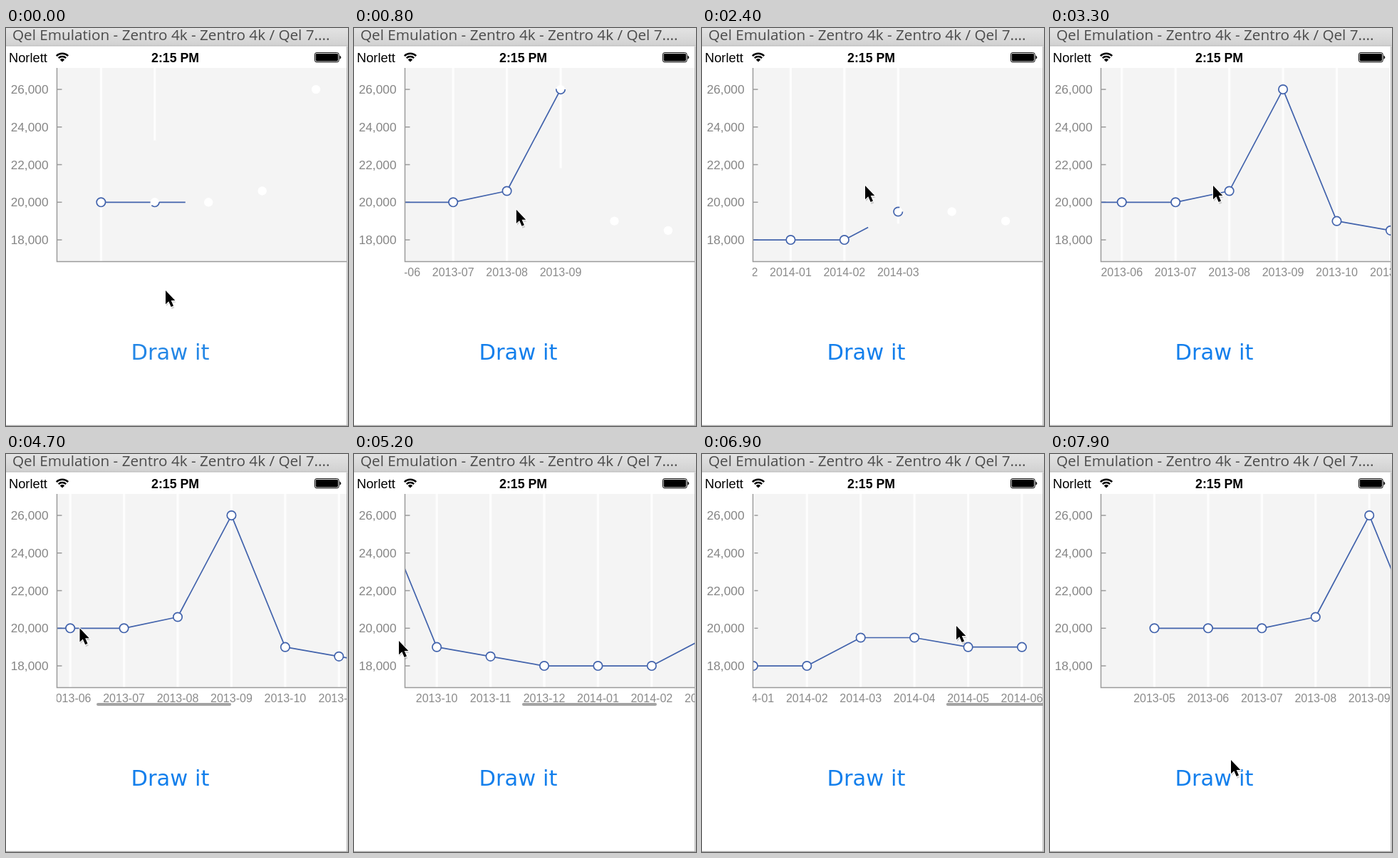
Write an HTML page that moves like this. It is 480 by 558 pixels and loops after 8000 ms.

```html
<!DOCTYPE html>
<html lang="en">
<head>
<meta charset="utf-8">
<title>Line chart</title>
<style>
  html, body { margin: 0; width: 100%; height: 100%; overflow: hidden; background: #fff; }
  svg { display: block; width: 480px; height: 558px; }
  text { font-family: "Liberation Sans", Arial, sans-serif; }
  .title { font: 20.7px "Open Sans", sans-serif; fill: #4b4b4b; }
  .status { font-size: 18.3px; }
  .clock { font-size: 17.7px; font-weight: bold; text-anchor: middle; }
  .value { font-size: 17.3px; fill: #858585; text-anchor: end; }
  .month { font-size: 16px; fill: #8a8a8a; text-anchor: middle; }
  .button { font: 30.5px "DejaVu Sans", Verdana, sans-serif; }
  .axis { fill: none; stroke: #9b9b9b; stroke-width: 1.5; }
  .bar { stroke: #fdfdfd; stroke-width: 3.2; }
  .line, .ring { fill: none; stroke: #4263ac; stroke-width: 1.7; }
  .line { stroke-linejoin: round; }
  .dot { fill: #fff; }
</style>
</head>
<body>
<svg viewBox="0 0 480 558">
  <defs>
    <linearGradient id="chrome" x2="0" y2="1">
      <stop stop-color="#e3e3e3"/><stop offset="1" stop-color="#d1d1d1"/>
    </linearGradient>
    <clipPath id="plot"><rect x="71" y="56" width="408" height="272"/></clipPath>
    <clipPath id="view"><rect x="71" y="56" width="408" height="310"/></clipPath>
  </defs>

  <rect width="480" height="25" fill="url(#chrome)"/>
  <path d="M0 25H480" stroke="#b4b4b4"/>
  <text class="title" x="9" y="17">Qel Emulation - Zentro 4k - Zentro 4k / Qel 7....</text>

  <text class="status" x="4" y="48">Norlett</text>
  <g fill="none" stroke="#000" stroke-width="2.4">
    <path d="M70.8 39.2A11.6 11.6 0 0 1 87.2 39.2M73.8 42.2A7.4 7.4 0 0 1 84.2 42.2"/>
    <path d="M79 47.6L75.8 44.4A4.6 4.6 0 0 1 82.2 44.4Z" fill="#000" stroke="none"/>
  </g>
  <text class="clock" x="237.5" y="47.5">2:15 PM</text>
  <rect x="433.4" y="34.6" width="33.8" height="13.2" rx="2.6" fill="none" stroke="#000"/>
  <rect x="434.7" y="35.9" width="31.2" height="10.6" rx="1.4"/>
  <path d="M468.4 38.6Q470.2 39.4 470.2 41.2T468.4 43.8Z"/>

  <rect x="71" y="56" width="408" height="271" fill="#f4f4f4"/>
  <g id="values"></g>
  <g clip-path="url(#plot)"><g id="chart"></g></g>
  <path class="axis" d="M71.5 56V327.6H478"/>
  <g clip-path="url(#view)">
    <g id="months"></g>
    <rect id="thumb" y="349" width="189" height="4" rx="2" fill="#a3a3a3"/>
  </g>
  <text class="button" id="button" x="175.6" y="465">Draw it</text>
  <path d="M478.8 26V558M0 557.4H480" stroke="#a9a9a9" stroke-width="1.3"/>

  <g id="cursor">
    <path d="M1 3V22L5.2 17.8L8.6 26L12.4 24.4L9 16.8H14.6Z" fill="#000" opacity=".16"/>
    <path d="M0 0V19.2L4.3 15.2L7.7 23L11 21.6L7.7 14H13.3Z" stroke="#fff" stroke-width="1.8" paint-order="stroke"/>
  </g>
</svg>
<script>
const LOOP = 8000, STEP = 75.42, TOP = 56, BASE = 327, RADIUS = 6.2;
const HOME = 146.5, MAX_SCROLL = 678;
const DRAW_START = -349, DRAW_TIME = 3563;
const data = [20, 20, 20, 20.6, 26, 19, 18.5, 18, 18, 18, 19.5, 19.5, 19, 19];
const ITEM_TIME = DRAW_TIME / data.length;

const $ = id => document.getElementById(id);
const clamp = v => Math.min(1, Math.max(0, v));
const yOf = v => 244.3 - (v - 20) * 26.37;

function add(parent, tag, attrs, text = "") {
  const el = document.createElementNS("http://www.w3.org/2000/svg", tag);
  for (const k in attrs) el.setAttribute(k, attrs[k]);
  el.textContent = text;
  return parent.appendChild(el);
}

function bezier(x1, y1, x2, y2) {
  const at = (a, b, u) => 3 * a * u * (1 - u) ** 2 + 3 * b * u * u * (1 - u) + u ** 3;
  return x => {
    let lo = 0, hi = 1;
    for (let i = 0; i < 24; i++) {
      const mid = (lo + hi) / 2;
      if (at(x1, x2, mid) < x) lo = mid; else hi = mid;
    }
    return at(y1, y2, lo);
  };
}
const linear = x => x;
const inOut = bezier(.42, 0, .58, 1);
const ease = bezier(.25, .1, .25, 1);
const out = x => 1 - (1 - x) ** 2.4;

// Each key is [time, value, easing towards this value].
function track(keys, t) {
  const i = keys.findIndex(k => k[0] > t);
  if (i < 0) return keys[keys.length - 1][1];
  if (i === 0) return keys[0][1];
  const [t0, v0] = keys[i - 1], [t1, v1, fn = linear] = keys[i];
  return v0 + (v1 - v0) * fn((t - t0) / (t1 - t0));
}

const scroll = [
  [-336, 0], [3064, MAX_SCROLL, inOut], [3520, 0, ease],
  [4380, 0], [4700, 131.5, inOut], [4860, 172], [5700, 502, out],
  [6020, 512], [6200, 575], [6520, MAX_SCROLL, out],
  [6960, MAX_SCROLL], [7140, 570], [7640, 0, out]
];
const cursorX = [
  [400, 224], [1000, 229, inOut], [4380, 229], [4700, 104, inOut], [4900, 63, out],
  [5720, 63], [6000, 440, inOut], [6220, 357, out],
  [6940, 357], [7160, 450, out], [7320, 450], [7700, 262, inOut], [7900, 254, out]
];
const cursorY = [
  [400, 368], [1000, 221, inOut], [4380, 221], [4700, 244, inOut], [4900, 262, out],
  [5720, 262], [6000, 238, inOut], [6220, 241],
  [7320, 241], [7700, 310, inOut], [7900, 429, out]
];
const thumbAlpha = [[4380, 0], [4450, 1], [7560, 1], [7760, 0]];

for (let v = 18; v <= 26; v += 2) {
  const y = yOf(v);
  add($("values"), "text", { class: "value", x: 59.5, y: y + 6 }, v + ",000");
  add($("values"), "path", { class: "axis", d: `M72 ${y}h6.5` });
}

const chart = $("chart");
const points = data.map((v, i) => [i * STEP, yOf(v)]);
const bars = points.map(([x]) => add(chart, "line", { class: "bar", x1: x, x2: x, y1: TOP }));
const line = add(chart, "path", { class: "line", d: "M" + points.join("L") });
const length = line.getTotalLength();
line.setAttribute("stroke-dasharray", length + " " + length);
const rings = points.map(([cx, cy]) => {
  add(chart, "circle", { class: "dot", cx, cy, r: RADIUS });
  return add(chart, "circle", { class: "ring", cx, cy, r: RADIUS, pathLength: 1 });
});
const months = points.map(([x], i) => {
  const m = i + 4;
  const label = 2013 + Math.floor(m / 12) + "-" + String(m % 12 + 1).padStart(2, "0");
  return add($("months"), "text", { class: "month", x, y: 348 }, label);
});

function render(t) {
  const offset = track(scroll, t);
  const shift = `translate(${HOME - offset} 0)`;
  chart.setAttribute("transform", shift);
  $("months").setAttribute("transform", shift);

  const drawn = clamp((t - DRAW_START) / DRAW_TIME);
  line.setAttribute("stroke-dashoffset", length * (1 - drawn));
  points.forEach((_, i) => {
    const start = DRAW_START + i * ITEM_TIME;
    const p = clamp((t - start) / ITEM_TIME);
    bars[i].setAttribute("y2", TOP + (BASE - TOP) * p);
    bars[i].style.display = rings[i].style.display = p ? "" : "none";
    rings[i].setAttribute("stroke-dasharray", p < 1 ? p + " 2" : "none");
    months[i].style.display = t >= Math.max(150, start) ? "" : "none";
  });

  $("thumb").setAttribute("x", 75 + offset * .395);
  $("thumb").setAttribute("opacity", track(thumbAlpha, t));
  $("button").setAttribute("fill", t < 300 ? "#2487e6" : "#137fec");
  $("cursor").setAttribute("transform", `translate(${track(cursorX, t)} ${track(cursorY, t)})`);
}

const begin = performance.now();
function tick() {
  render((performance.now() - begin) % LOOP);
  requestAnimationFrame(tick);
}
tick();
</script>
</body>
</html>
```
